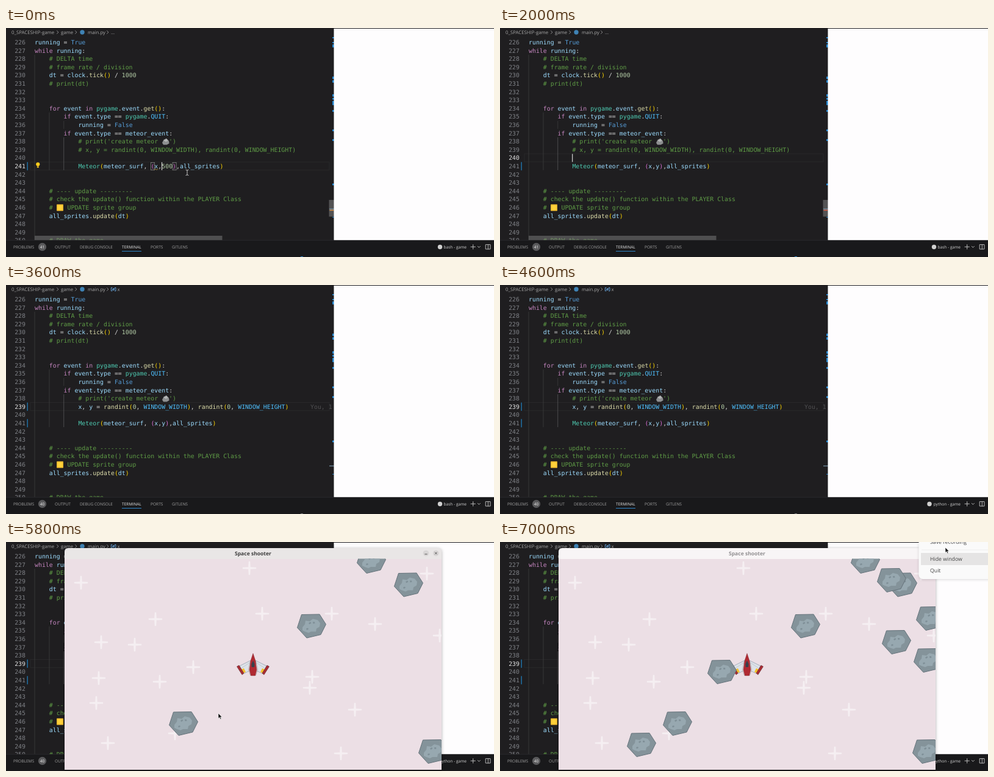
Write an HTML page that moves like this. It is 800 by 377 pixels and loops after 7200 ms.

```html
<!DOCTYPE html>
<html lang="en">
<head>
<meta charset="utf-8">
<title>Editor and game</title>
<style>
html, body { margin: 0; height: 100%; overflow: hidden; background: #1f1e20; }
svg { display: block; width: 100vw; height: 100vh; }
text { white-space: pre; text-rendering: geometricPrecision; }
.code { font: 9.88px "DejaVu Sans Mono", monospace; }
.ui { font-family: "Open Sans", "Noto Sans", sans-serif; }
.win { filter: drop-shadow(0 1px 2.5px rgba(0,0,0,.32)); }
.menu { filter: drop-shadow(0 1px 2px rgba(0,0,0,.14)); }
</style>
</head>
<body>
<svg id="stage" viewBox="0 0 800 377" preserveAspectRatio="none"></svg>
<script>
const stage = document.getElementById('stage');
const LOOP = 7200, STEP = 200;
const CW = 5.95, LH = 13.6, LEFT = 47, FIRST = 226;

const colX = c => LEFT + c * CW;
const midY = n => 23.5 + (n - FIRST) * LH;

const rect = (x, y, w, h, fill, extra = '') =>
  `<rect x="${x}" y="${y}" width="${w}" height="${h}" fill="${fill}" ${extra}/>`;
const path = (d, fill, extra = '') => `<path d="${d}" fill="${fill}" ${extra}/>`;
const line = (d, color, w = 1) =>
  path(d, 'none', `stroke="${color}" stroke-width="${w}" stroke-linecap="round" stroke-linejoin="round"`);
const dot = (x, y, r, fill) => `<circle cx="${x}" cy="${y}" r="${r}" fill="${fill}"/>`;
const ui = (x, y, size, fill, str, extra = '') =>
  `<text class="ui" x="${x}" y="${y}" font-size="${size}" fill="${fill}" ${extra}>${str}</text>`;
const code = (x, n, fill, str, extra = '') =>
  `<text class="code" x="${x}" y="${midY(n) + 3.5}" fill="${fill}" ${extra}>${str}</text>`;

// ---- syntax colours ----
const GREEN = '#5f9c46', PLAIN = '#d4d4d4', VAR = '#9cdcfe';
const BRACKETS = ['#ffd700', '#da70d6'];
const words = {};
const paint = (color, list) => list.split(' ').forEach(w => words[w] = color);
paint('#c586c0', 'while for in if');
paint('#569cd6', 'True False');
paint('#dcdcaa', 'tick get update randint');
paint('#4ec9b0', 'pygame Meteor');
paint('#4fc1ff', 'QUIT WINDOW_WIDTH WINDOW_HEIGHT');

function codeLine(n, src) {
  const indent = src.search(/\S/);
  if (indent < 0) return '';
  if (src[indent] === '#') return code(colX(indent), n, GREEN, src.trim());
  let out = '', depth = 0;
  for (const m of src.matchAll(/\w+|[^\w\s]/g)) {
    const s = m[0];
    let color = PLAIN;
    if (s === '(') color = BRACKETS[depth++];
    else if (s === ')') color = BRACKETS[--depth];
    else if (/^\d/.test(s)) color = '#b5cea8';
    else if (/\w/.test(s)) color = words[s] || VAR;
    out += code(colX(m.index), n, color, s);
  }
  return out;
}

const tab = n => ' '.repeat(4 * n);
const source = (l239, l241) => [
  'running = True',
  'while running:',
  tab(1) + '# DELTA time',
  tab(1) + '# frame rate / division',
  tab(1) + 'dt = clock.tick() / 1000',
  tab(1) + '# print(dt)',
  '', '',
  tab(1) + 'for event in pygame.event.get():',
  tab(2) + 'if event.type == pygame.QUIT:',
  tab(3) + 'running = False',
  tab(2) + 'if event.type == meteor_event:',
  tab(3) + "# print('create meteor   ')",
  tab(3) + l239 + 'x, y = randint(0, WINDOW_WIDTH), randint(0, WINDOW_HEIGHT)',
  '',
  tab(3) + `Meteor(meteor_surf, (x,${l241}),all_sprites)`,
  '', '',
  tab(1) + '# ---- update ---------',
  tab(1) + '# check the update() function within the PLAYER Class',
  tab(1) + '#    UPDATE sprite group',
  tab(1) + 'all_sprites.update(dt)',
  '', '',
  tab(1) + '# DRAW the game'
];

// ---- editing script: value in force at time t ----
const at = (t, ...keys) => {
  let v;
  for (const [time, value] of keys) if (t >= time) v = value;
  return v;
};

function squiggle(x, n, w, color) {
  let d = `M${x} ${midY(n) + 6}`;
  for (let i = 0; i < w / 2; i++) d += `l2 ${i % 2 ? 1.4 : -1.4}`;
  return line(d, color, .7);
}

function editor(t) {
  const arg = at(t, [0, '500'], [400, '00'], [600, '0'], [800, ''], [1400, 'y']);
  const lead = at(t, [0, '# '], [2600, ' '], [3000, '']);
  const cur = at(t, [0, 241], [2000, 240], [2200, 239]);
  const col = at(t, [0, 35], [1400, 36], [2000, 12]);
  const caret = t < 3200 || Math.floor((t - 3200) / 400) % 2 === 0;
  let s = rect(0, 0, 538, 350, '#1f1e20');
  s += rect(40, midY(cur) - 6.8, 490, 13.2, 'none', 'stroke="#29282a" stroke-width="1"');

  // indent guides
  s += rect(46.6, 44, .8, 305, '#3c3c3e') + rect(70.6, 139, .8, 95, '#3c3c3e')
     + rect(94.4, 153, .8, 13, '#3c3c3e') + rect(94.4, 180, .8, 54, '#58585a');

  source(lead, arg).forEach((src, i) => {
    const n = FIRST + i, on = n === cur;
    s += code(32, n, on ? '#e2e2e2' : '#7f8186', n, `text-anchor="end" ${on ? 'font-weight="bold"' : ''}`);
    s += codeLine(n, src);
  });

  // pictograms in comments
  s += path('M256 189l2.5-5 4.5-2.2 4 4.2.6 4-4 2.2h-5.6z', '#8d8f90') + path('M258.5 185l4.5-2.6 2.6 3-3.6 2z', '#b4b6b6');
  s += rect(83, 290.2, 11, 11, '#e9b52c', 'rx="1"') + rect(84.5, 291.7, 8, 8, '#ffd23b');

  const changed = n => rect(34.4, midY(n) - 6.8, 1.6, 13.6, '#1f6c9e');
  s += changed(241);
  if (t >= 2600) s += changed(239);

  if (t < 2000) {
    const box = c => rect(colX(c), 221.4, 6, 12.4, 'none', 'stroke="#858585" stroke-width=".8"');
    s += box(32) + box(35 + arg.length) + squiggle(243, 241, 6, '#c9a53a');
  }
  if (t >= 800 && t < 1400) s += squiggle(154, 241, 6, '#e0493f');
  if (t >= 2600 && t < 3400) s += squiggle(118.5, 241, 35, '#e0493f');
  if (t < 400) s += dot(52.3, 224.3, 3.1, '#ffcc1c') + rect(50.8, 227.5, 3, 2.6, '#d9b32c');
  if (t >= 3600) s += code(499, 239, '#505052', 'You, 1 second ago');
  if (caret) s += rect(colX(col) - .3, midY(cur) - 6.6, 1.2, 13.2, '#d8d8d8');

  // scrollbars and overview marks
  if (t < 3400) s += rect(47, 342, 307.5, 7.5, '#8a8a8a', 'opacity=".45"') + rect(529.5, 283, 8.5, 27.5, '#777', 'opacity=".6"');
  for (const [y, h] of [[15, 2], [23, 2], [27, 5], [80, 4], [86, 4], [109, 4], [115, 3], [120, 7], [135, 3], [167, 3], [183, 3], [256, 3], [311, 1]])
    s += rect(535, y, 3, h, '#2385cc');
  s += rect(530, 297.3, 8, 1.2, '#7898ab');
  if (t < 3400) s += rect(530.5, 299.2, 7, 1.6, t < 800 ? '#d08b45' : '#d2604b');

  // breadcrumb
  const GREY = '#a6a6a6';
  s += rect(0, 0, 538, 14, '#1f1e20');
  s += ui(9, 9.7, 7.8, GREY, '0_SPACESHIP-game') + ui(90, 9.7, 7.8, GREY, 'game') + ui(134, 9.7, 7.8, GREY, 'main.py');
  for (const x of [83.5, 113.5, 165.5]) s += line(`M${x} 4.6l2.4 2.4-2.4 2.4`, GREY, .8);
  s += dot(125, 7, 3.7, '#3f83b5');
  if (t < 3200) s += ui(172, 9.7, 7.8, GREY, '…');
  else s += line('M174 4.4h-1.6v5.4h1.6M178.4 4.4h1.6v5.4h-1.6M174.8 7.1a1.5 1.5 0 1 0 3 0a1.5 1.5 0 1 0-3 0M174.8 8.6l3-3', '#75beff', .8)
          + ui(182.5, 9.7, 7.8, GREY, 'x');
  return s;
}

function panel(t) {
  const TAB = '#a0a0a0';
  let s = rect(537.5, 1, 262.5, 348.5, '#fefdfe');
  s += rect(0, 349.5, 800, 28, '#19191b') + rect(0, 349.2, 537.5, .8, '#2b2b2d');
  for (const [x, name] of [[12, 'PROBLEMS'], [80, 'OUTPUT'], [121, 'DEBUG CONSOLE'], [190, 'TERMINAL'], [237, 'PORTS'], [272, 'GITLENS']])
    s += ui(x, 362.8, 6.6, name === 'TERMINAL' ? '#e6e6e6' : TAB, name);
  s += rect(190, 367, 32, 1, '#2f86c9');
  s += dot(59.5, 360.4, 6.6, '#5a5a5c');
  s += ui(59.5, 362.9, 6.6, '#f2f2f2', at(t, [0, 41], [800, 42], [1400, 41], [3400, 40]), 'text-anchor="middle"');
  const py = t >= 4200;
  s += dot(py ? 704 : 711.5, 360.5, 3.7, '#d0d0d0');
  s += ui(755, 362.8, 6.6, '#d2d2d2', (py ? 'python' : 'bash') + ' - game', 'text-anchor="end"');
  s += line('M762 360.3h7.4M765.7 356.6v7.4M773.4 359.4l2 2 2-2M786.6 356.6h7.4v7.4h-7.4zM790.3 356.6v7.4', '#c8c8c8', .9);
  s += rect(483, 376, 4, 1, at(t, [0, '#2f86c9'], [2600, '#77777a'], [4800, '#19191b']));
  return s;
}

// ---- game window ----
const stars = [[399, 43], [123, 67], [690, 52], [420, 118], [245, 127], [534, 118], [605, 135], [711, 154], [156, 165], [211, 169],
  [307, 206], [502, 222], [498, 240], [152, 224], [252, 230], [148, 265], [572, 276], [277, 315], [167, 331], [549, 348]];
const rocks = [[599, 32], [660, 70.5], [501, 138.5], [291, 299], [700, 345], [642, 63], [706, 126], [650, 165], [702, 195], [364, 214], [232, 334]];

const place = (x, y, body) => `<g transform="translate(${x} ${y})">${body}</g>`;
const star = path('M-1.6-1.6L-1-11H1L1.6-1.6 11-1V1L1.6 1.6 1 11H-1L-1.6 1.6-11 1V-1z', '#fff', 'opacity=".5" stroke="#fff" stroke-opacity=".35" stroke-width="1"');
const rock = path('M-23.5 2.5L-16.5-19 13-19.5 23.5-3 15 14-8 19.5z', '#84939a', 'stroke="#65727a" stroke-width="1" stroke-linejoin="round"')
  + path('M-15 2l4-5 1-6 7 1 5-4 8 2 4 5-1 6-5 3-1 5-8 0-4 2-6-2-4-2z', '#97a8b0')
  + path('M-5-5l3-2 1.5 2-3 2zM2-7l3 0 .5 2.5-3 .5zM-9 4l3-1 1 2-3 1.5z', '#7f8f97');

const half = path('M-4-7L-22 2-16 15-4 9z', '#dde2e8', 'stroke="#8a96a4" stroke-width=".7" stroke-linejoin="round"')
  + line('M-6-3L-18 5', '#b8c1cb', .8)
  + path('M-20 8l5-2 3 6-6 3z', '#f5c02f')
  + path('M-26.5 3L-23 1-15 14-18 16.5z', '#a92b33', 'stroke="#5b2a32" stroke-width=".6"');
const ship = half + `<g transform="scale(-1 1)">${half}</g>`
  + path('M0-14L5-4 7.5 8 4.5 17.5H-4.5L-7.5 8-5-4z', '#ece8ea', 'stroke="#9a8288" stroke-width=".6"')
  + path('M0-18.5L4-6 5 2 6 8 3.5 18H-3.5L-6 8-5 2-4-6z', '#b02a32', 'stroke="#7c2128" stroke-width=".5"')
  + path('M0-7L2.6-1 2.2 4H-2.2L-2.6-1z', '#39404b');

function gameWindow(t) {
  const active = t < 6800;
  const edge = 'M96 28V16q0-6 6-6H708q6 0 6 6V28z';
  let s = rect(96, 27, 618, 348, '#ecdfe5') + path(edge, active ? '#e9e6e6' : '#f8f5f6');
  s += ui(405, 21.6, 8.55, active ? '#3d3d3d' : '#929092', 'Space shooter', 'font-weight="bold" text-anchor="middle"');
  if (active) s += dot(688.5, 18.5, 4.8, '#d8d5d5') + dot(704.8, 18.5, 4.8, '#d8d5d5')
    + line('M686.8 20h3.4M703.3 17l3 3M706.3 17l-3 3', '#444', .9);
  let body = stars.map(p => place(...p, star)).join('') + place(405, 202, ship);
  const count = Math.round((t - 4800) / STEP);
  body += rocks.slice(0, count).map(p => place(...p, rock)).join('');
  s += `<g clip-path="url(#body)">${body}</g>`;
  const k = t < 5000 ? .9935 : 1;
  return `<g class="win" transform="translate(405 375) scale(${k}) translate(-405 -375)">${s}</g>`;
}

function menu(t) {
  if (t < 6800) return '';
  return `<g class="menu">${rect(686.5, -20, 130, 81, '#fafafa', 'rx="7"')}</g>`
    + rect(691, 12.6, 109, .8, '#ececec') + rect(690, 18, 120, 20, '#e5e4e4')
    + ui(705, 2.6, 8.74, '#444', 'Save recording') + ui(705, 31, 8.74, '#444', 'Hide window') + ui(705, 50.4, 8.74, '#444', 'Quit');
}

// ---- pointer ----
const route = [[4800, 491, 371], [5400, 392, 311], [5800, 348, 282], [6000, 348, 282], [6400, 600, 90], [6600, 722, 3], [6800, 728, 26], [7000, 730, 9]];

function follow(t) {
  let i = 0;
  while (i < route.length - 2 && t >= route[i + 1][0]) i++;
  const [t0, x0, y0] = route[i], [t1, x1, y1] = route[i + 1];
  const k = Math.min(1, (t - t0) / (t1 - t0));
  return [x0 + (x1 - x0) * k, y0 + (y1 - y0) * k];
}

function pointer(t) {
  if (t < 1400) {
    const k = Math.min(1, t / 1200);
    return place(297 + 22.5 * k, 238 + 3 * k, line('M-2-4.5q2 0 2 1.2 0-1.2 2-1.2M0-3.5V3.5M-2 4.5q2 0 2-1.2 0 1.2 2 1.2', '#d5d5d5', .9));
  }
  if (t < 4800) return '';
  return place(...follow(t), path('M0 0V8.4L2 6.7 3.6 10 5 9.3 3.5 6.2H6.2z', '#111', 'stroke="#fff" stroke-width=".6"'));
}

function draw(t) {
  stage.innerHTML = `<defs><clipPath id="body">${rect(96, 27.5, 618, 347.5, '#000')}</clipPath></defs>`
    + editor(t) + panel(t) + (t >= 4800 ? gameWindow(t) : '') + menu(t) + pointer(t);
}

let last = -1;
const start = performance.now();
function tick() {
  const t = Math.floor(((performance.now() - start) % LOOP) / STEP) * STEP;
  if (t !== last) draw(last = t);
  requestAnimationFrame(tick);
}
tick();
</script>
</body>
</html>
```
